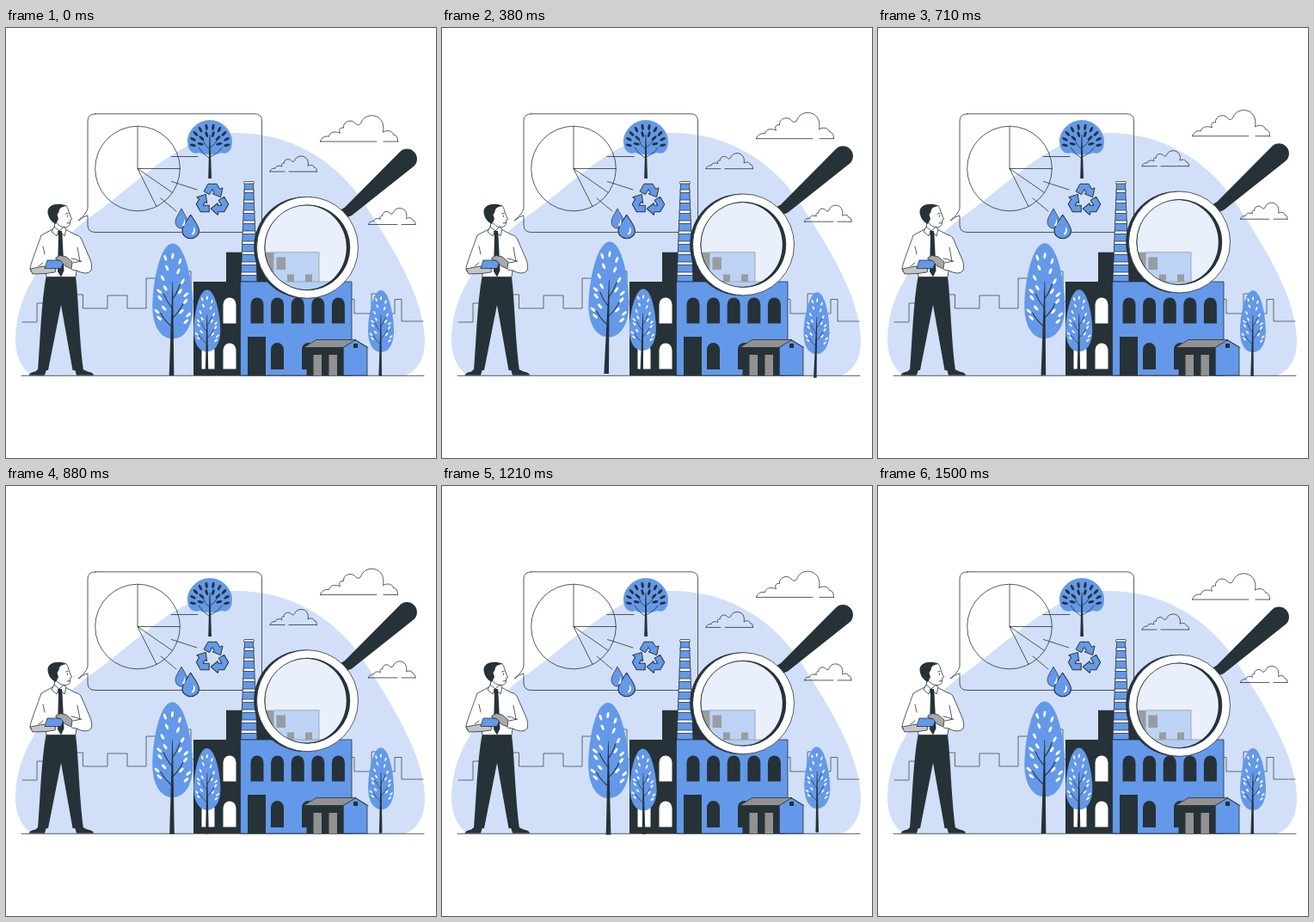
Animation, 500 px wide and 500 px high, one loop 1540 ms. Source, as an HTML page:

```html
<!DOCTYPE html>
<html lang="en">
<head>
<meta charset="utf-8">
<title>Factory inspection</title>
<style>
  html, body { margin: 0; width: 100%; height: 100%; overflow: hidden; background: #fff; }
  svg { display: block; width: 100vw; height: 100vh; }
  .ln { fill: none; stroke: #263238; stroke-width: .8; stroke-linecap: round; stroke-linejoin: round; }
  .o { stroke: #263238; stroke-width: .8; stroke-linejoin: round; }
  .d { fill: #263238; }
  .b { fill: #6499e9; }
  .w { fill: #fff; }
  .g { fill: #919191; }
</style>
</head>
<body>
<svg viewBox="0 0 500 500" xmlns="http://www.w3.org/2000/svg">
  <defs>
    <path id="puff" d="M0 30C1 25 6 23 10 24C11 18 18 18 23 20C21 16 23 13 27 14C26 6 37 3 41 9C43 11 45 11 47 9C50-1 62-3 69 3C73 7 74 12 73 19C77 16 84 17 85 22C89 22 90 26 90 30" vector-effect="non-scaling-stroke"/>
    <path id="recycle" d="M-2.800-5.100L-8-8.100L-4-15H4L6.800-10.300L9.600-11.300L7.700-2.700L.100-5.800L1.800-6.800L0-10Z"/>
    <path id="drop" d="M0-13C3-7 7-1 7 4A7 8 0 0 1-7 4C-7-1-3-7 0-13Z"/>
  </defs>

  <path fill="#d1e0f8" d="M30 404C15 395 8 372 12 348C17 298 57 247 110 211C160 173 210 122 267 122C327 122 378 150 412 197C438 238 487 308 487 363C487 386 477 400 464 404Z"/>

  <g class="ln" stroke-opacity=".85">
    <path d="M19 342H36V320H46M75 310H89.500V326H118V311H141V326H163V291H193V283H215V318H222"/>
    <path d="M401 315.500H405V332H425V309H433V332H452V315.500H460V341H485"/>
  </g>
  <path class="ln" stroke-width="1" d="M18 404.300H486"/>

  <!-- speech bubble -->
  <g class="ln">
    <path d="M104 99.800H289Q297.500 99.800 297.500 108V229Q297.500 237.500 289 237.500H104Q95 237.500 95 229V218Q90 219 84 224Q93 217 95 210V108Q95 99.800 104 99.800Z"/>
    <circle cx="153" cy="163.500" r="49.300"/>
    <path d="M153 114.500V163.500H202M153 163.500L193.500 191.500M153 163.500L175 207.500M192 149.500H223M192.500 178.500L222 188M180 198L198 213"/>
  </g>
  <path class="b" d="M237 107C251 107 263 119 263 132C263 142 258 148 250 145C244 148 231 148 225 145C217 148 211 142 211 132C211 119 223 107 237 107Z"/>
  <g id="dome" class="d"></g>
  <g class="b o" transform="translate(240 200) scale(1.250)">
    <use href="#recycle"/><use href="#recycle" transform="rotate(120)"/><use href="#recycle" transform="rotate(240)"/>
  </g>
  <g class="b o">
    <use href="#drop" transform="translate(204 222) scale(1 .920)"/>
    <use href="#drop" transform="translate(214.700 231.500) scale(1.400 1.100)"/>
  </g>
  <path class="w" d="M207 222Q210 226 207 230Q205 231 205 229Q208 226 207 222ZM218 231Q222 235 218 240Q215 241 216 239Q219 236 218 231Z"/>

  <!-- factory -->
  <g id="factory">
    <path class="d" d="M218 404V295H256V260.800H311V296H276V404Z"/>
    <path class="o" fill="#74a4ec" d="M311 260.800H364V296H311Z"/>
    <path class="d" d="M314.500 266.500H325V281H314.500ZM327 286.500H335V297H327ZM348 286.500H356V297H348Z"/>
    <path class="b o" d="M277.500 180H287.500L292 295H273Z"/>
    <g id="bands" class="w"></g>
    <rect class="w o" x="276.500" y="178.500" width="12" height="2.500" rx="1"/>
    <path class="b o" d="M272.500 295H402V404H272.500Z"/>
    <g id="arches"></g>
    <path class="d" d="M281 359H302V404H281Z"/>
    <path class="b o" d="M392 371.500L406 362.500L420 371.500V404H392Z"/>
    <path class="d" d="M349.500 371H392.500V404H349.500ZM404 367H409V372H404Z"/>
    <path class="g o" d="M346 371.500L361 362.500H407L392 371.500Z"/>
    <path class="g" d="M357.500 380H367V404H357.500ZM375.500 380H385V404H375.500Z"/>
    <path class="ln" d="M406 362.500L421 371.500"/>
  </g>

  <!-- man -->
  <g id="man">
    <path class="d" d="M46.500 289.500H81C84 310 85 360 90 398H77.500L64 322L49 398H37C40 360 41 320 46.500 289.500Z"/>
    <path class="d" d="M37 397H47L45 403.800H26.500Q27 401 34 399.500ZM80 397H89.500L95 399.500Q102 401 102 403.800H82Z"/>
    <path class="w o" d="M57 224L56 235L62 242L68 236L67 231Z"/>
    <path class="w o" d="M61 209L70 206.500C73 211 73 215 75 219L76.500 222.500L74.500 223.500C75 228 74 232 67.500 231.500C63 231 59 228 57 223Z"/>
    <path class="d" d="M48.500 214C48 205 61 202.500 70 206.500C65 207.500 62 209 61.500 214L59.500 217L61 222L58 228C52 225 49 220 48.500 214Z"/>
    <path class="ln" d="M69.500 216L72 215.500M71.500 218V219.500M71 227L74 226.500"/>
    <path class="w o" d="M56 233L41 241C37 253 30 270 28 279Q28 285 34 285L46 283L47 289.500H81L82 282Q94 288 99 282Q101 276 97 267L87 244Q85 241 80 240L69 234L62 242Z"/>
    <path class="w o" d="M56 231L53 237L59 242L62 236L68 242L70 234L67 231L62 236Z"/>
    <path class="d" d="M60 236H65L65.500 241L67.500 282L64 289.500L60 283L61 241Z"/>
    <path class="ln" d="M43 254L45 263M83 255L86 271M86 271Q80 268 76 268M38 277L43 273M78 273L88 271M76 281L82 282"/>
    <path class="o" fill="#c4c4c4" d="M28 280L44 277L58 280L57 284L46 285.500L31 286Z"/>
    <path class="b o" d="M48 270H68L64 279.500H45Z"/>
    <path class="o" fill="#a9a9a9" d="M58 267L63 264.500L70 266L77 272L76 280L69 277L64 271L58 269Z"/>
  </g>

  <g id="trees"></g>

  <!-- clouds -->
  <g class="float ln">
    <use href="#puff" transform="translate(365.500 102.200)"/>
    <path d="M365.500 132H431M439 132H455.500"/>
    <use href="#puff" transform="translate(307 149.200) scale(.605 .590)"/>
    <path d="M307 167H324M329 167H361.500"/>
    <use href="#puff" transform="translate(421.500 209.700) scale(.605 .630)"/>
    <path d="M421.500 228.500H455M460 228.500H476"/>
  </g>

  <!-- magnifier -->
  <g class="float">
    <path class="d" d="M389 211.500L394 208.500L458 144A11.600 11.600 0 1 1 474.500 160.500L402 218L396 220.500Z"/>
    <ellipse cx="348.500" cy="255.300" rx="47.500" ry="49.200" fill="#fff" fill-opacity=".52"/>
    <path class="d" id="back" fill-rule="evenodd"/>
    <path class="w o" id="rim" fill-rule="evenodd"/>
    <path class="d" id="edge" fill-rule="evenodd"/>
  </g>
</svg>
<script>
const $ = id => document.getElementById(id);
const disc = (x, rx, ry = rx) =>
  `M${x - rx} 255.300a${rx} ${ry} 0 1 0 ${2 * rx} 0a${rx} ${ry} 0 1 0 ${-2 * rx} 0Z`;
const leaf = (x, y, len, angle, cls) =>
  `<ellipse class="${cls}" rx="${len * .42}" ry="${len}" transform="translate(${x} ${y}) rotate(${angle})"/>`;

$('back').setAttribute('d', disc(347.5, 59.3) + disc(350.5, 50));
$('rim').setAttribute('d', disc(350.5, 59) + disc(350.3, 49.5));
$('edge').setAttribute('d', disc(350.3, 49.6) + disc(348.5, 47.3, 49));

const arch = (x, y, h, cls) =>
  `<path class="${cls}" d="M${x} ${y + h}v${8 - h}a7.500 8 0 0 1 15 0v${h - 8}Z"/>`;
let holes = '';
for (let i = 0; i < 5; i++) holes += arch(284.5 + i * 23.6, 313.5, 30, 'd');
for (const x of [308, 344]) holes += arch(x, 366, 31, 'd');
for (const x of [227.5, 252.5]) holes += arch(x, 313.5, 30, 'w') + arch(x, 366.5, 30, 'w');
$('arches').innerHTML = holes;

let bands = '';
for (let y = 188; y < 290; y += 12) {
  const half = 5 + (y - 180) * .039, x = 282.5;
  bands += `<path class="o" stroke-width=".4" d="M${x - half} ${y}h${2 * half}l.200 3.500h${-2 * half - .4}Z"/>`;
}
$('bands').innerHTML = bands;

// Egg-shaped crown with a tapering trunk, branches and paired leaves
function tree(x, top, w, h, base, lean) {
  const a = w / 2, at = f => top + h * f;
  let s = `<path class="b" d="M${x} ${top}C${x + a * .64} ${top} ${x + a} ${at(.42)} ${x + a} ${at(.66)}` +
    `C${x + a} ${at(.88)} ${x + a * .55} ${at(1)} ${x} ${at(1)}C${x - a * .55} ${at(1)} ${x - a} ${at(.88)} ${x - a} ${at(.66)}` +
    `C${x - a} ${at(.42)} ${x - a * .64} ${top} ${x} ${top}Z"/>`;
  const t = w * .06, b = x + lean;
  s += `<path class="d" d="M${x - .3} ${at(.4)}L${b - t} ${base}H${b + t}L${x + .3} ${at(.4)}Z"/>`;
  let twigs = '';
  for (let i = 0; i < 4; i++) {
    const side = i % 2 ? 1 : -1, y = .88 - i * .1, r = a * (.6 - i * .08);
    twigs += `M${x} ${at(y)}Q${x + side * r * .6} ${at(y - .06)} ${x + side * r} ${at(y - .15)}`;
  }
  s += `<path class="ln" d="${twigs}" style="stroke-width:${w * .022}"/>`;
  const len = w * .075;
  for (let i = 0; i < 7; i++) {
    const f = .17 + i * .105, reach = a * Math.min(.78, .3 + f * .75);
    for (const side of [-1, 1]) {
      const dy = side * .018;
      s += leaf(x + side * reach * (i % 2 ? .55 : .85), at(f + dy), len, side * (18 + i * 5), 'w');
      if (i > 2 && i % 2) s += leaf(x + side * reach, at(f + dy + .035), len, side * 48, 'w');
    }
  }
  return s + leaf(x, at(.13), len, 8, 'w');
}
$('trees').innerHTML =
  tree(193.8, 250.5, 47, 111, 404, -1.3) +
  tree(233.8, 304.5, 31, 72, 404, -.3) +
  tree(436, 305, 30, 72, 404.5, -.8);

// Dark foliage fanning out around the small tree
let dome = '<path d="M236.600 124L235.200 175H239L237.400 124Z"/>' +
  '<path class="ln" d="M237 152Q228 146 224 139M237 150Q247 146 251 139M237 141Q230 136 229 129M237 139Q244 135 246 129"/>';
for (const [n, rx, ry] of [[10, 20, 18], [6, 11, 10]]) {
  for (let i = 0; i < n; i++) {
    const k = (i / (n - 1) - .5) * 3.5;
    dome += leaf(237 + rx * Math.sin(k), 133 - ry * Math.cos(k), 3.6, k * 45, 'd');
  }
}
$('dome').innerHTML = dome;

// A 1.5 s cycle at 24 steps per second; the rest pose closes the loop
const LOOP = 1540, STEPS = 36;
const floats = document.querySelectorAll('.float');
const triangle = p => 1 - 4 * Math.abs((p + .25) % 1 - .5);

function pose(now) {
  const step = Math.floor((now % LOOP + 4) * .024);
  const p = step % STEPS / STEPS;
  const lift = -6.67 * (1 - Math.abs(2 * p - 1));
  for (const el of floats) el.setAttribute('transform', `translate(0 ${lift})`);
  $('trees').setAttribute('transform', `rotate(${triangle(p)} 310 327)`);
}
function tick(now) {
  pose(now);
  requestAnimationFrame(tick);
}
pose(0);
requestAnimationFrame(tick);
</script>
</body>
</html>
```
